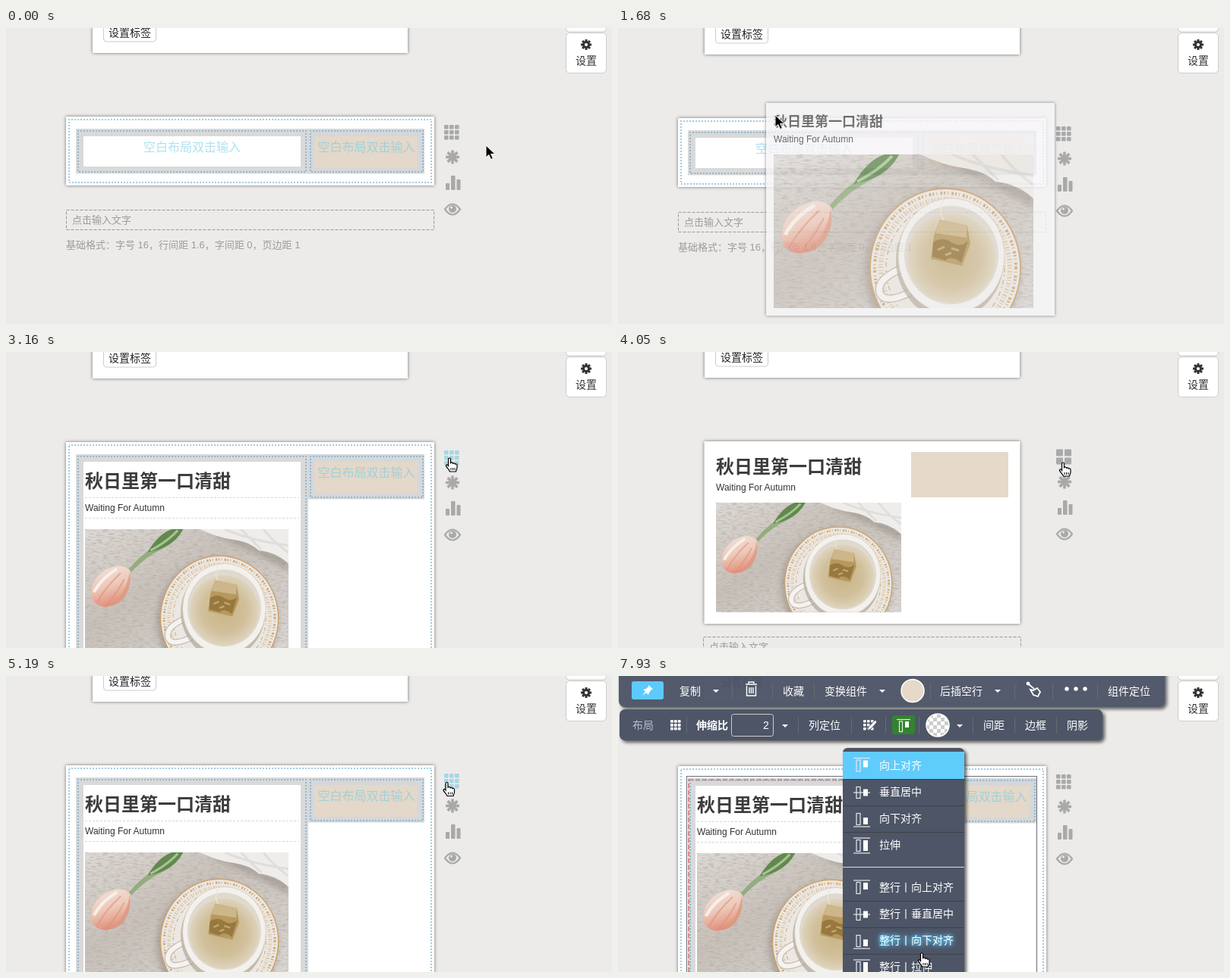
Recreate the animation shown at these times as an HTML page. Size 798 by 391 pixels, loop 8 s.

```html
<!DOCTYPE html>
<html lang="zh">
<head>
<meta charset="utf-8">
<style>
html, body { margin: 0; width: 100%; height: 100%; overflow: hidden; background: #ecebe9; }
svg { display: block; width: 798px; height: 391px; }
text { font-family: "Liberation Sans", "Noto Sans CJK SC", "Noto Sans CJK", sans-serif; white-space: pre; }
.paper { filter: drop-shadow(0 0 2px #0008); }
.bar { filter: drop-shadow(3px 3px 2px #0009); }
.glow { filter: drop-shadow(0 0 2px #5cf) drop-shadow(0 0 3px #5cf); }
.dots { stroke-width: 2; stroke-dasharray: 2 2; stroke-dashoffset: 1; }
</style>
</head>
<body>
<svg id="stage" viewBox="0 0 798 391"></svg>
<script>
const LOOP = 8000, STEPS = 91;   // the screen refreshes 91 times per loop
const GRAY = '#a9a9a9', BEIGE = '#e5d9c9', SLATE = '#4d5567';
const TITLE = '秋日里第一口清甜', SUBTITLE = 'Waiting For Autumn', BLANK = '空白布局双击输入';

// Drawing helpers; text is placed by its vertical centre
const rect = (x, y, w, h, fill, more = '') =>
  `<rect x="${x}" y="${y}" width="${w}" height="${h}" fill="${fill}" ${more}/>`;
const path = (d, fill = 'none', more = '') => `<path d="${d}" fill="${fill}" ${more}/>`;
const circle = (x, y, r, fill, more = '') => `<circle cx="${x}" cy="${y}" r="${r}" fill="${fill}" ${more}/>`;
const ellipse = (x, y, rx, ry, fill, more = '') =>
  `<ellipse cx="${x}" cy="${y}" rx="${rx}" ry="${ry}" fill="${fill}" ${more}/>`;
const text = (x, cy, size, str, fill, more = '') =>
  `<text x="${x}" y="${cy + size * .38}" font-size="${size}" fill="${fill}" ${more}>${str}</text>`;
const group = (id, body, more = '') => `<g id="${id}" ${more}>${body}</g>`;
const line = (color, width = 1, dash = '') =>
  `stroke="${color}" stroke-width="${width}" stroke-dasharray="${dash}"`;
const dotted = (x, y, w, h, color) => rect(x, y, w, h, 'none', `class="dots" stroke="${color}"`);
const range = n => [...Array(n).keys()];
const photo = (x, y, width) => `<use href="#photo" transform="translate(${x} ${y}) scale(${width / 342})"/>`;
const gridIcon = (x, y, n, cell, pitch, fill) => range(n * n).map(i =>
  rect(x + i % n * pitch, y + (i / n | 0) * pitch, cell, cell, fill, 'rx="1"')).join('');
const spokes = (x, y, n, r, width, color) => range(n).map(i =>
  path(`M${x} ${y - r}V${y + r}`, 'none', line(color, width) + ` transform="rotate(${i * 180 / n} ${x} ${y})"`)).join('');

const photoArt = `
  <clipPath id="frame"><rect width="342" height="203"/></clipPath>
  <linearGradient id="linen" x2="1" y2="1">
    <stop stop-color="#dedad6"/><stop offset=".42" stop-color="#c8c1ba"/><stop offset="1" stop-color="#dad7d4"/>
  </linearGradient>
  <radialGradient id="tea"><stop stop-color="#c9b384"/><stop offset=".65" stop-color="#d1c09b"/><stop offset="1" stop-color="#ded3bd"/></radialGradient>
  <linearGradient id="petal" x1=".2" y1="0" x2=".5" y2="1">
    <stop stop-color="#f2e2da"/><stop offset=".5" stop-color="#edc9ba"/><stop offset="1" stop-color="#e08a74"/>
  </linearGradient>
  <filter id="weave"><feTurbulence type="fractalNoise" baseFrequency=".1 .4" numOctaves="3" seed="4"/>
    <feColorMatrix values="0 0 0 0 .45  0 0 0 0 .4  0 0 0 0 .36  2.4 0 0 0 -1.05"/></filter>
  <filter id="soft"><feGaussianBlur stdDeviation="5"/></filter>
  <g id="photo" clip-path="url(#frame)">` +
  rect(0, 0, 342, 203, 'url(#linen)') +
  rect(0, 0, 342, 203, '#000', 'filter="url(#weave)" opacity=".7"') +
  path('M200 4Q260 26 300 48T342 72V50L250 10Z', '#8f857c', 'opacity=".5" filter="url(#soft)"') +
  path('M193 0Q222 14 250 18T292 36Q320 38 342 58V0Z', '#efedeb') +
  path('M235 0Q275 18 342 28M262 0L296 34M300 0Q315 20 342 40', 'none', line('#dbd8d4', 4) + ' opacity=".7"') +
  path('M72 70Q96 38 130 24T150 0H165Q156 20 128 34T78 72Z', '#93ad80') +
  path('M105 39Q124 7 146 0H165Q148 32 105 39Z', '#61894f') +
  path('M110 36Q140 20 156 2', 'none', line('#a9c293', 4)) +
  path('M12 118Q5 88 34 69Q62 54 76 70Q80 92 68 112Q58 128 34 131Q18 130 12 118Z', 'url(#petal)') +
  path('M42 130Q70 108 75 72Q80 92 68 112Q58 128 42 130Z', '#dd9a84', 'opacity=".8"') +
  path('M20 124Q34 98 60 74M34 130Q54 108 66 84', 'none', line('#dc8f7a', 2.5) + ' opacity=".6"') +
  path('M15 106Q28 82 54 67', 'none', line('#f8efea', 5)) +
  ellipse(222, 156, 102, 107, '#857a70', 'opacity=".45" filter="url(#soft)"') +
  ellipse(226, 150, 99, 105, '#ebe7e2', line('#cda06a', 1.8)) +
  ellipse(226, 150, 93, 99, 'none', line('#cfa978', 4, '2 3 1 4 3 2')) +
  ellipse(226, 150, 85, 91, 'none', line('#dcc5a6', 6, '1 3 2 2')) +
  ellipse(226, 150, 78, 84, 'none', line('#d3b28a', 1.5, '6 3 2 5')) +
  path('M166 152Q134 166 140 184Q148 199 184 180', 'none', line('#c3b9af', 11)) +
  path('M166 152Q134 166 140 184Q148 199 184 180', 'none', line('#f5f3f0', 8)) +
  ellipse(232, 140, 71, 78, '#b0a699', 'opacity=".7"') +
  ellipse(234, 134, 70, 76, '#f3f1ee', line('#dccbb3', 1)) +
  ellipse(234, 133, 62, 65, '#dfd9ce') +
  ellipse(234, 137, 58, 59, 'url(#tea)') +
  path('M226 90Q215 77 224 60', 'none', line('#eee6d8', 1.5)) +
  path('M219 86L255 94L259 118L248 147L207 138L211 108Z', '#b7995f') +
  path('M219 86L255 94L254 110L213 104Z', '#cdb68a') +
  path('M210 116Q222 108 234 116T256 114L247 143Q234 132 226 140L209 135Z', '#937239', 'opacity=".85"') +
  path('M216 126l9-4M234 124l10 3M226 133l8-3', 'none', line('#c3a76c', 3)) +
  '</g>';

const sideIcons = group('gridEdit', gridIcon(577, 128, 3, 5.6, 7, 'currentColor')) +
  group('gridView', gridIcon(577, 127.5, 2, 9, 11, GRAY)) +
  spokes(588, 170.5, 4, 9, 3.6, GRAY) +
  rect(579, 205, 5, 9, GRAY, 'rx="1"') + rect(586, 195, 5.5, 19, GRAY, 'rx="1"') + rect(593.5, 200, 5, 14, GRAY, 'rx="1"') +
  path('M578 239.5Q588 225.5 598 239.5Q588 253.5 578 239.5Z', '#ecebe9', line(GRAY, 2.2)) +
  circle(588, 239, 5, GRAY) + circle(586.5, 237, 1.5, '#ecebe9');

const topCard = rect(114, -20, 415, 53, '#fff', 'class="paper"') +
  rect(128.5, -12, 69, 30, '#fff', 'rx="4" ' + line('#ccc')) + text(135, 6, 14, '设置标签', '#222');

const outerCard = height => rect(79, 117, 485, height, '#fff', 'class="paper"') +
  dotted(83, 121, 477, height - 8, '#a3cbe0');
const cellDots = (x, w, h) => dotted(x, 136, w, h, '#92b7d0');
const rightCell = rect(398, 133, 153, 59.5, '#d5d7d9') + rect(406, 143, 136, 42, '#e3d8c9') +
  cellDots(401, 148, 54) + text(410.5, 157, 16, BLANK, '#a2d0d9');

const footer = (x, y, w) => rect(x + .5, y + .5, w, 26, 'none', line('#999', 1, '4 2')) +
  text(x + 8, y + 13.5, 13, '点击输入文字', '#9c9c9c') +
  text(x, y + 46, 13, '基础格式：字号 16，行间距 1.6，字间距 0，页边距 1', '#9c9c9c');

const emptyLayout = outerCard(91) + rect(92, 133, 306, 59.5, '#d9d9d9') +
  rect(102, 143, 286, 40, '#fff') + cellDots(95, 300, 54) + text(181, 157, 16, BLANK, '#ade0f0') + rightCell;

const filledLayout = outerCard(400) + rect(92, 133, 306, 300, '#d9d9d9') +
  rect(102, 143, 286, 290, '#fff') + cellDots(95, 300, 300) + rightCell +
  text(104, 168, 24, TITLE, '#3c3c3c', 'font-weight="bold"') +
  path('M104 190.5H386M104 217.5H386', 'none', line('#d8d8d8', 1, '3 2')) +
  text(104, 203, 12, SUBTITLE, '#333') + photo(104, 232, 268) +
  group('selection', rect(90.5, 130.5, 461, 300, 'none', line('#6b6f78')) +
    rect(93, 135, 304, 300, 'none', line('#d78a8a', 2, '6 3')));

const viewLayout = rect(113.5, 117, 416, 241, '#fff', 'class="paper"') +
  text(129, 150, 24, TITLE, '#3c3c3c', 'font-weight="bold"') + text(129, 177, 12, SUBTITLE, '#333') +
  photo(129, 198, 244) + rect(386, 131, 128, 60, BEIGE) + footer(112, 375, 418);

const ghost = rect(0, 0, 380, 281, '#f7f5f7', 'class="paper"') +
  text(10, 24, 18, TITLE, '#555', 'font-weight="bold"') + text(10, 47, 12, SUBTITLE, '#444') + photo(10, 68, 342);

const settings = rect(737.5, -20, 53, 25, '#fff', 'rx="4" ' + line('#ccc')) +
  rect(737.5, 6.5, 53, 53, '#fff', 'rx="5" ' + line('#ccc')) +
  spokes(764, 22, 4, 7, 3, '#333') + circle(764, 22, 3.6, '#fff', line('#333', 3)) + text(750, 43, 14, '设置', '#333');

// Alignment glyph: an outlined bar and a solid bar against a guide line
function alignIcon(x, y, kind) {
  const guides = { top: [-10], middle: [0], bottom: [10], stretch: [-10, 10] }[kind];
  const [solidY, solidH] = { top: [-7, 9], middle: [-4.5, 9], bottom: [-2, 9], stretch: [-7, 14] }[kind];
  return `<g transform="translate(${x} ${y})">` +
    guides.map(g => path(`M-11 ${g}H11`, 'none', line('#e6e8ec', 1.2))).join('') +
    rect(-7, -7.5, 5, 15, 'none', line('#e6e8ec', 1.2)) + rect(2, solidY, 6, solidH, '#fff') + '</g>';
}
const caret = (x, y) => path(`M${x - 4} ${y - 2}h8l-4 4z`, '#fff');
const dividers = (y, ...xs) => xs.map(x => path(`M${x}.5 ${y - 11}v22`, 'none', line('#656a74'))).join('');
const label = (x, y, str, fill = '#fff', more = '') => text(x, y, 14, str, fill, more);

const toolbars =
  rect(1, -12, 719, 53, SLATE, 'rx="8" class="bar" opacity=".96"') +
  rect(2, 44, 636, 41, SLATE, 'rx="7" class="bar"') +
  rect(18, 7, 42, 24, '#5ccafc', 'rx="3"') +
  path('M40 12l6 5-2 1-3 4-1 3-3-3-5 4 4-6-3-2 4-1 3-3z', '#fff') +
  label(81, 19.5, '复制') + caret(129, 20) +
  path('M168 11h15M172 10v-2h7v2M169.5 13v13h12V13M173 15v8M175.5 15v8M178 15v8', 'none', line('#fff', 1.4)) +
  label(217, 19.5, '收藏') + label(272, 19.5, '变换组件') + caret(348, 20) +
  circle(388, 19.5, 15, BEIGE, line('#fff', 1.5)) +
  label(424, 19.5, '后插空行') + caret(500, 20) +
  path('M541 11l7 6M547 25l-4-7 4 1 5-3 4 5-3 6z', 'none', line('#fff', 1.8)) + circle(540, 10, 2.4, '#fff') +
  [591, 603, 615].map(x => circle(x, 17, 2.7, '#fff')).join('') + label(645, 19.5, '组件定位') +
  dividers(20, 150, 203, 258, 411, 522, 572, 631) +
  label(19, 65, '布局', '#b9bec8') + gridIcon(69, 58, 3, 3.8, 4.9, '#fff') +
  label(103, 65, '伸缩比', '#fff', 'font-weight="bold"') +
  rect(149.5, 50.5, 55, 29, 'none', 'rx="3" ' + line('#ccc')) + label(191, 65, '2') + caret(220, 66) +
  label(251, 65, '列定位') +
  gridIcon(323, 58, 3, 3.6, 5, '#fff') + path('M339 58l-9 9-2 5 5-2 8-9z', '#fff', line(SLATE)) +
  group('alignActive', rect(361, 52, 30, 25, '#33822f', 'rx="3"')) +
  path('M367 57.5H385', 'none', line('#e6e8ec', 1.2)) +
  rect(370.5, 60, 4, 13.5, 'none', line('#e6e8ec', 1.2)) + rect(378, 60, 5, 8, '#fff') +
  circle(421, 65, 15, 'url(#checker)', line('#fff', 1.5)) + caret(450, 66) +
  label(481, 65, '间距') + label(536, 65, '边框') + label(591, 65, '阴影') +
  dividers(65, 90, 237, 307, 352, 396, 467, 522, 577);

const kinds = [['top', '向上对齐'], ['middle', '垂直居中'], ['bottom', '向下对齐'], ['stretch', '拉伸']];
const rowY = [117.5, 153, 188, 223, 279, 314, 349, 384];
const menu = rect(296, 95, 160, 320, SLATE, 'rx="6" class="bar"') + rect(296, 100, 160, 36, '#60ccfc') +
  [136, 171, 206, 297, 332, 367].map(y => path(`M296 ${y}.5H456`, 'none', line('#3f4044'))).join('') +
  path('M296 252.5H456', 'none', line('#d9dbdf')) +
  rowY.map((y, i) => alignIcon(321, y + 1, kinds[i % 4][0]) +
    label(344, y, (i > 3 ? '整行丨' : '') + kinds[i % 4][1], '#fff', 'data-row')).join('');

document.getElementById('stage').innerHTML = `<defs>${photoArt}
  <pattern id="checker" width="10" height="10" patternUnits="userSpaceOnUse">
    ${rect(0, 0, 10, 10, '#fff') + path('M0 0h5v10h5V5H0z', '#ccc')}</pattern></defs>` +
  group('page', topCard + group('empty', emptyLayout + group('foot', footer(79, 240, 484))) +
    group('filled', filledLayout) + group('view', viewLayout) + sideIcons) +
  settings + group('ghost', ghost, 'opacity=".8"') + group('bars', toolbars) + group('menu', menu) +
  group('arrow', path('M0 0V16l3.8-3.5 2.8 6 2.8-1.2-2.8-5.8H12z', '#000', line('#fff'))) +
  group('hand', path('M-1.5 1.5c0-2 3-2 3 0v5c1-1 3-.5 3 .7 1-.8 3-.3 3 .9 1-.6 2.5 0 2.5 1.4v3.5c0 2-1.5 3-1.5 5h-8c-1-3-4.5-5.5-5-7.5-.4-1.6 1.3-2 2.2-1l.8 1z', '#fff', line('#000', 1.2)) +
    path('M2 13v3M4.5 13v3M7 13v3', 'none', line('#000')));

// Keys are [step, values...]
const pointerPath = [
  [0, 632, 155], [6, 660, 166], [9, 660, 166], [10, 520, 135], [11, 255, 78], [16, 14, 8],
  [17, 20, 10], [19, 207, 115], [23, 228, 160], [25, 230, 165], [27, 230, 165],
  [33, 572, 134], [36, 584, 140], [38, 584, 140], [43, 604, 155], [45, 604, 155],
  [46, 586, 146], [47, 584, 142], [52, 584, 142], [56, 579, 145], [59, 580.5, 140.5], [62, 581, 143],
  [68, 378, 139], [73, 378, 139], [77, 376, 62], [80, 376, 62], [83, 380, 124], [90, 400, 366]];
const pageDrop = [[0, 0], [2, 2], [45, 2], [47, 0], [48, 0], [50, 2], [58, 2], [60, 0], [62, 0], [64, 2], [90, 2]];

function sample(keys, step) {
  const i = Math.max(1, keys.findIndex(key => key[0] >= step));
  const [a, b] = [keys[i - 1], keys[i]];
  const f = (step - a[0]) / (b[0] - a[0]);
  return a.slice(1).map((v, j) => v + (b[j + 1] - v) * f);
}

const $ = id => document.getElementById(id);
const show = (id, on) => { $(id).style.display = on ? '' : 'none'; };
const move = (id, x, y) => $(id).setAttribute('transform', `translate(${x} ${y})`);
const rows = [...document.querySelectorAll('[data-row]')];

function render(step) {
  const [x, y] = sample(pointerPath, step), [drop] = sample(pageDrop, step);
  const viewing = step >= 39 && step < 56, menuOpen = step >= 78;
  const onGrid = x > 574 && x < 600 && y > 126 && y < 150;
  const visible = step < 12 || step > 16, hand = onGrid || step >= 76;

  move('page', 0, drop);
  move('foot', 0, drop / 2);
  show('empty', step < 28);
  show('filled', step >= 28 && !viewing);
  show('view', viewing);
  show('gridView', viewing);
  show('gridEdit', !viewing);
  $('gridEdit').style.color = onGrid ? '#a6d6e6' : GRAY;

  show('ghost', step >= 17 && step < 25);
  move('ghost', x - 12, y - 16);
  show('selection', step >= 70);
  show('bars', step >= 70);
  $('bars').style.opacity = step === 70 ? .6 : 1;
  show('alignActive', step >= 77);
  show('menu', menuOpen);
  rows.forEach((row, i) =>
    row.classList.toggle('glow', i > 0 && menuOpen && Math.abs(y - rowY[i]) < 17.5));

  show('arrow', visible && !hand);
  show('hand', visible && hand);
  move('arrow', x, y);
  move('hand', x, y);
}

const start = performance.now();
function tick() {
  const t = (performance.now() - start) % LOOP;
  render(Math.min(STEPS - 1, Math.floor((t + 12) * STEPS / LOOP)));
  requestAnimationFrame(tick);
}
tick();
</script>
</body>
</html>
```
